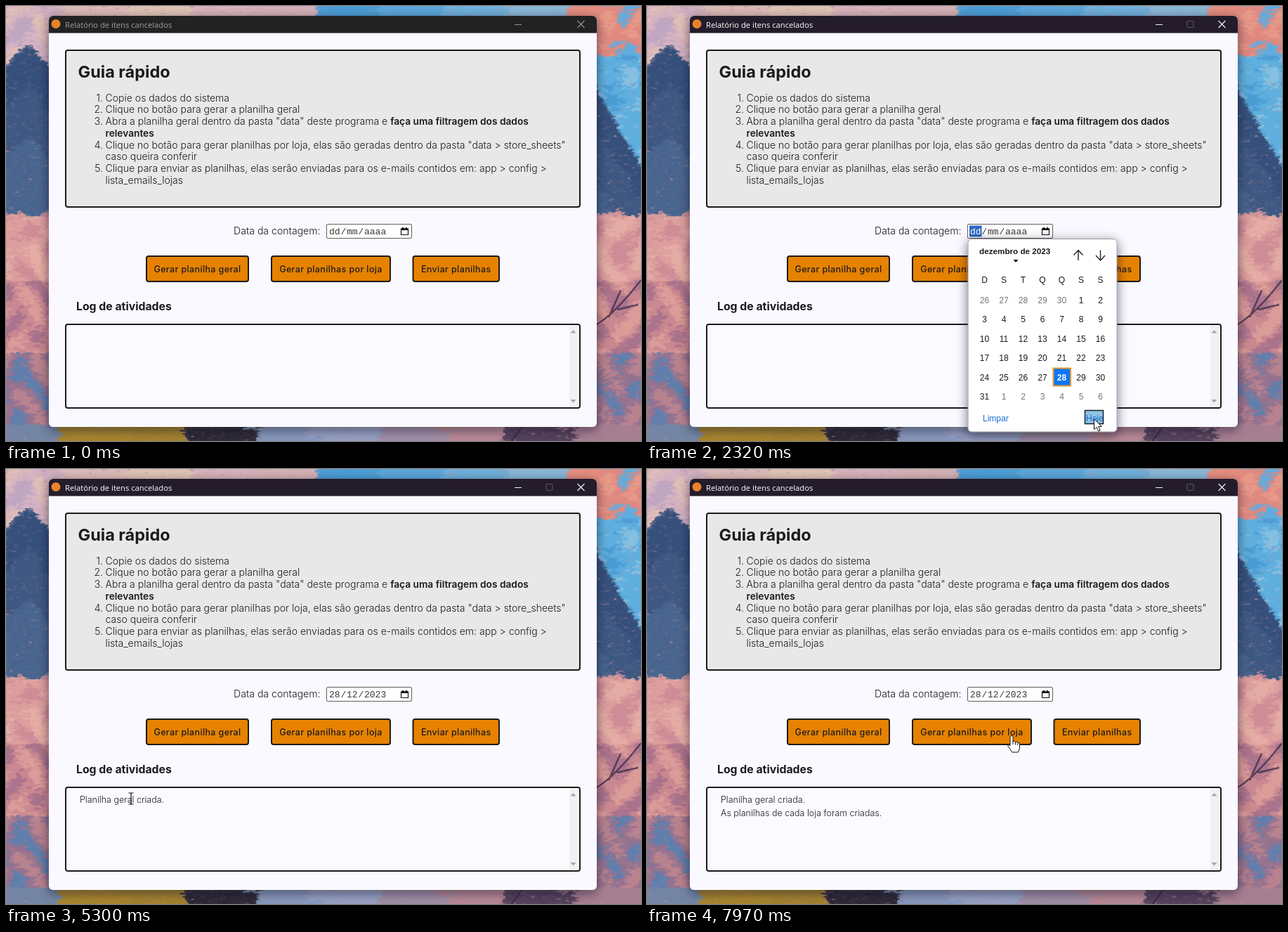
Write an HTML page with a canvas that moves like this. It is 904x619 px and loops after 8 s.

```html
<!DOCTYPE html>
<html lang="pt-BR">
<head>
<meta charset="utf-8">
<title>Relatório de itens cancelados</title>
<style>
  html, body { margin: 0; width: 100%; height: 100%; overflow: hidden; background: #c98f98; }
  canvas, svg { position: absolute; inset: 0; width: 100vw; height: 100vh; display: block; }
  text { font-family: Inter, sans-serif; font-optical-sizing: none; fill: #1b1b1f; white-space: pre; }
  .guide { font-size: 14.04px; font-weight: 300; }
  .guide tspan { font-size: .978em; font-weight: 600; }
  .panel { stroke: #1b1b1b; stroke-width: 2; }
  .button text { font-size: 12.48px; font-weight: 500; letter-spacing: .39px; text-anchor: middle; }
  .button rect { fill: #e68200; }
  .log { font-size: 12.48px; font-weight: 300; }
  .date text { font: 13px "Liberation Mono", monospace; fill: #3a3a3a; }
  .calendar text { font: 12px "Liberation Sans", Arial, sans-serif; }
  .calendar .day { text-anchor: middle; }
  .calendar .other { fill: #757575; }
  .calendar .today { fill: #fff; font-weight: 700; }
  .calendar .link { fill: #1a6fd0; }
</style>
</head>
<body>
<canvas id="wall" width="904" height="619"></canvas>
<svg viewBox="0 0 904 619" preserveAspectRatio="none">
  <defs>
    <filter id="shadow" x="-10%" y="-10%" width="120%" height="120%">
      <feDropShadow dx="0" dy="4" stdDeviation="8" flood-color="#101020" flood-opacity=".55"/>
    </filter>
  </defs>

  <rect x="61" y="14" width="780" height="585" rx="6" fill="#f9f9ff" filter="url(#shadow)"/>
  <path id="titleBar" d="M61 38.5V20a6 6 0 0 1 6-6H835a6 6 0 0 1 6 6V38.5Z"/>
  <circle cx="71" cy="25.5" r="6.5" fill="#e8822c"/>
  <text id="title" x="84" y="30.5" style="font: 11.2px 'Open Sans', sans-serif">Relatório de itens cancelados</text>
  <g id="controls" fill="none" stroke-width="1.1">
    <path d="M724 26.5h10M813.5 21l10 10m0-10l-10 10"/>
    <rect id="maximize" x="769" y="21.5" width="9" height="9" rx="1.5" stroke="#5c5360"/>
  </g>

  <rect class="panel" x="85" y="63" width="732" height="223" rx="3" fill="#e8e8e8"/>
  <text x="102.5" y="102" font-size="23.5" font-weight="700">Guia rápido</text>
  <g id="guide" class="guide"></g>

  <text x="324" y="324.5" font-size="14.1" font-weight="300">Data da contagem:</text>
  <g class="date">
    <rect x="456.5" y="310.5" width="121" height="20" rx="1.5" fill="#fff" stroke="#6a5a5e"/>
    <rect id="daySelection" x="459" y="312.5" width="17.5" height="16" fill="#2c67c4"/>
    <g id="dateText"></g>
    <path d="M562.5 317h10v8.500h-10z" fill="none" stroke="#111" stroke-width="1.2"/>
    <path d="M562 316.500h11v2.500h-11zM564 315h2v2h-2zM569 315h2v2h-2z" fill="#111"/>
  </g>

  <g id="buttons" class="button"></g>

  <text x="100" y="432.5" font-size="15.8" font-weight="700">Log de atividades</text>
  <rect class="panel" x="85" y="453" width="732" height="119" rx="3" fill="#fafaff"/>
  <rect x="802" y="454.5" width="13.5" height="116" fill="#f1f1f1"/>
  <path d="M803.5 465.500l4-4.500 4 4.500zM803.5 560l4 4.500 4-4.500z" fill="#a6a6b2"/>
  <text id="firstLog" class="log" x="105" y="474.5">Planilha geral criada.</text>
  <text id="secondLog" class="log" x="105" y="493.5">As planilhas de cada loja foram criadas.</text>

  <g id="calendar" class="calendar">
    <rect x="457" y="331.5" width="212" height="274.5" rx="5" fill="#fff" stroke="#9b9ba3" filter="url(#shadow)"/>
    <text x="473" y="353" style="font-size: 11.7px; font-weight: 700">dezembro de 2023</text>
    <path d="M521.5 361h7l-3.500 3.800z"/>
    <path d="M614 362v-14m-6.500 6.500l6.500-7 6.500 7M645.5 347.500v14m-6.500-6.500l6.500 7 6.500-7" fill="none" stroke="#222" stroke-width="1.4"/>
    <rect x="578.5" y="515.5" width="24.5" height="25" fill="#0f75f5" stroke="#e09a28" stroke-width="2"/>
    <g id="days"></g>
    <text class="link" x="478" y="590.5">Limpar</text>
    <rect id="todayFocus" x="623.5" y="575.5" width="26" height="19" fill="#8fc3e6" stroke="#14222e" stroke-width="1.5"/>
    <text class="link" x="625" y="590.5">Hoje</text>
  </g>

  <g id="pointer">
    <path id="arrow" d="M.5 .5V15.500L4 12.200 6.600 18.200 9.200 17 6.600 11.300H11.300Z" fill="#fff" stroke="#111"/>
    <g id="hand">
      <path d="M-2 1.500Q-2 -.5 0 -.5T2 1.500V8Q4.500 6.300 5.500 8.500 8 7 8.800 9.500 11.500 8.500 11.500 11.500V16Q11.500 19 9.300 23H.5Q-1 19.500-5 14.500-5.500 11.500-2 13.500Z" fill="#fff" stroke="#111"/>
      <path d="M2 8v4M5.500 9v3.500M8.700 10v3" stroke="#111"/>
    </g>
    <path id="beam" d="M-3.500 -8H-1Q0 -8 0 -7Q0 -8 1 -8H3.500M0 -7V7M-3.500 8H-1Q0 8 0 7Q0 8 1 8H3.500" fill="none" stroke="#111" stroke-width="1.2"/>
  </g>
</svg>

<script>
const DURATION = 8000;
const CALENDAR_OPEN = 1250, TODAY_PRESSED = 2230, DATE_SET = 2520;
const FIRST_LOG = 3750, SECOND_LOG = 6750;

const $ = id => document.getElementById(id);
const text = (x, y, content, attrs = '') => `<text x="${x}" y="${y}" ${attrs}>${content}</text>`;
const show = (id, visible) => $(id).setAttribute('visibility', visible ? 'inherit' : 'hidden');
const pick = (list, share) => list[Math.max(0, Math.min(list.length - 1, Math.floor(share * list.length)))];

// Wallpaper: short brush strokes coloured by where they fall.
const TOP = ['#cfb0c2', '#dcbcb8', '#e2c4b8', '#d8b4bc', '#d6b2b8', '#4a9fd8', '#5aa8dc', '#6fb2de', '#8ab8d8', '#e58d80'];
const BOTTOM = ['#7385a6', '#a8862e', '#a3832f', '#2e2a38', '#8799bf', '#97a1c4', '#a08fa8', '#b88a98', '#54425c', '#a77f92'];
const LEFT_SKY = ['#c0a8c4', '#d6b4c2', '#e2bfba'];
const RIGHT_SKY = ['#4a9ed6', '#5eb0e0', '#86c0e2'];
const CORAL = ['#5faee0', '#e08a80', '#ea9a88'];
const MOUNTAIN = ['#36507c', '#3e5883', '#48658f'];
const CLOUDS = [
  ['#cf8d97', '#dd9f9e', '#e6aea6'],
  ['#a9738c', '#cb8890', '#dc9d9a'],
  ['#5f7fae', '#96738f', '#b8838f'],
];

function wallColor(x, y, shade) {
  const left = x < 452;
  if (y > 596) return pick(BOTTOM, x / 904 + shade * .03);
  if (y < 20 && x > 55 && x < 845) return pick(TOP, x / 904 + shade * .03);
  const ridge = left ? 52 + Math.abs(x - 30) * 1.1 : 120 + (x - 840) * 1.7;
  const foot = 288 + shade * 14;
  if (y < ridge) return pick(left ? LEFT_SKY : y < 70 ? CORAL : RIGHT_SKY, shade);
  if (y < foot) return pick(MOUNTAIN, (y - ridge) / 230 + shade * .2);
  return pick(pick(CLOUDS, (y - 288) / 309), shade);
}

function paintWall() {
  const ctx = $('wall').getContext('2d');
  let seed = 11;
  const random = () => (seed = seed * 16807 % 2147483647) / 2147483647;
  ctx.fillStyle = '#b98a96';
  ctx.fillRect(0, 0, 904, 619);
  ctx.globalAlpha = .75;
  for (let y = 0; y < 622; y += 3)
    for (let x = 0; x < 908; x += 4) {
      if (x > 70 && x < 832 && y > 22 && y < 590) continue;
      const wave = Math.sin(x * .11 + 3 * Math.sin(y * .04)) + Math.sin(y * .09 + 2 * Math.sin(x * .07));
      ctx.fillStyle = wallColor(x, y, .5 + wave * .22 + (random() - .5) * .35);
      ctx.beginPath();
      ctx.ellipse(x + random() * 4, y + random() * 3, 3 + random() * 4, 1.5 + random() * 2, random() - .5, 0, 7);
      ctx.fill();
    }
  ctx.strokeStyle = '#3a2845';
  ctx.lineWidth = 2.5;
  ctx.stroke(new Path2D('M838 455Q865 440 904 390M858 443L875 405M870 432L900 425M720 619L735 598'));
}

const guideLines = [
  '1. Copie os dados do sistema',
  '2. Clique no botão para gerar a planilha geral',
  '3. Abra a planilha geral dentro da pasta "data" deste programa e <tspan>faça uma filtragem dos dados</tspan>',
  '<tspan>relevantes</tspan>',
  '4. Clique no botão para gerar planilhas por loja, elas são geradas dentro da pasta "data &gt; store_sheets"',
  'caso queira conferir',
  '5. Clique para enviar as planilhas, elas serão enviadas para os e-mails contidos em: app &gt; config &gt;',
  'lista_emails_lojas',
];

const buttons = [
  { left: 200, right: 345, label: 'Gerar planilha geral' },
  { left: 378, right: 547, label: 'Gerar planilhas por loja' },
  { left: 579.5, right: 702, label: 'Enviar planilhas' },
];

function buildPage() {
  $('guide').innerHTML = guideLines.map((line, i) => {
    const [, number, content] = line.match(/^(\d\.)? ?(.*)$/);
    const y = 135.7 + i * 16.71;
    return text(138, y, number || '', 'text-anchor="end"') + text(141.5, y, content);
  }).join('');

  $('buttons').innerHTML = buttons.map(({ left, right, label }) =>
    `<rect class="panel" x="${left}" y="356" width="${right - left}" height="36" rx="3"/>` +
    text((left + right) / 2, 378.5, label)).join('');

  const columnX = column => 480.5 + column * 27.5;
  let days = [...'DSTQQSS'].map((name, i) => text(columnX(i), 394, name, 'class="day"')).join('');
  for (let i = 0; i < 42; i++) {
    const date = new Date(2023, 10, 26 + i);
    const day = date.getDate();
    const kind = date.getMonth() !== 11 ? 'other' : day === 28 ? 'today' : '';
    days += text(columnX(i % 7), 422.7 + Math.floor(i / 7) * 27.5, day, `class="day ${kind}"`);
  }
  $('days').innerHTML = days;
}

// Where the pointer rests; bend bows the way there sideways.
const stops = [
  { leave: 100, x: 815, y: 640 },
  { arrive: 780, leave: 1500, x: 567, y: 321, bend: -25 },
  { arrive: 2180, leave: 2650, x: 636, y: 587, bend: 0 },
  { arrive: 3500, leave: 4450, x: 277, y: 367, bend: 10 },
  { arrive: 5250, leave: 5900, x: 178, y: 469, bend: 0 },
  { arrive: 6550, leave: 7250, x: 499, y: 374, bend: 45 },
  { arrive: 7800, leave: DURATION, x: 519, y: 380, bend: 0 },
];

function pointerAt(time) {
  const index = stops.findIndex(stop => time <= stop.leave);
  const to = stops[index], from = stops[index - 1];
  if (!from || time >= to.arrive) return [to.x, to.y];
  const p = (time - from.leave) / (to.arrive - from.leave);
  const eased = p * p * (3 - 2 * p);
  const dx = to.x - from.x, dy = to.y - from.y;
  const bow = to.bend * Math.sin(Math.PI * eased) / Math.hypot(dx, dy);
  return [from.x + dx * eased - dy * bow, from.y + dy * eased + dx * bow];
}

function drawDate(date, selected) {
  let x = 460;
  $('dateText').innerHTML = date.split(/(\/)/).map((part, i) => {
    const field = text(x, 325, part, selected && i === 0 ? 'style="fill: #fff"' : '');
    x += part.length * 7.8 + .8;
    return field;
  }).join('');
}

function render(time) {
  const active = time >= CALENDAR_OPEN;
  const open = active && time < DATE_SET;
  $('titleBar').setAttribute('fill', active ? '#241c2a' : '#222');
  $('title').style.fill = active ? '#fff' : '#a0a0a0';
  $('controls').setAttribute('stroke', active ? '#f2f2f2' : '#929292');
  show('maximize', active);
  show('calendar', open);
  show('daySelection', open);
  show('todayFocus', open && time >= TODAY_PRESSED);
  show('firstLog', time >= FIRST_LOG);
  show('secondLog', time >= SECOND_LOG);
  drawDate(time < DATE_SET ? 'dd/mm/aaaa' : '28/12/2023', open);

  const [x, y] = pointerAt(time);
  const overButton = !open && y > 355 && y < 393 && buttons.some(({ left, right }) => x > left && x < right);
  const overLog = time >= FIRST_LOG && y > 461 && y < 480 && x > 105 && x < 226;
  $('pointer').setAttribute('transform', `translate(${Math.round(x)} ${Math.round(y)})`);
  show('hand', overButton);
  show('beam', overLog);
  show('arrow', !overButton && !overLog);
}

function tick() {
  render(performance.now() % DURATION);
  requestAnimationFrame(tick);
}

paintWall();
buildPage();
tick();
</script>
</body>
</html>
```
